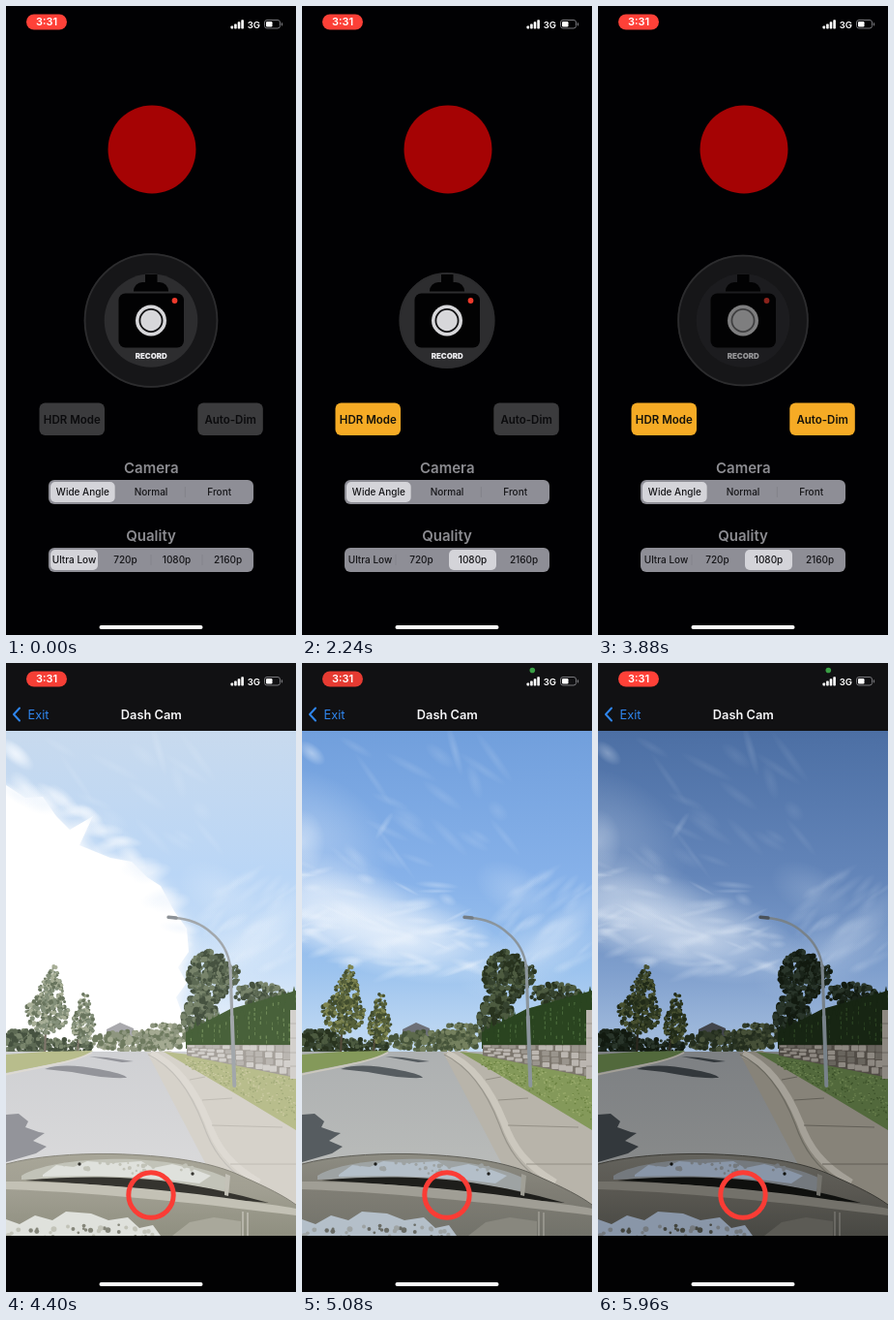
Animation of 300x649 px, one loop 6 s. Source, as an HTML page with a canvas:

```html
<!DOCTYPE html>
<html lang="en">
<head>
<meta charset="utf-8">
<title>Dash Cam</title>
<style>
  html, body { margin: 0; width: 100%; height: 100%; overflow: hidden; background: #000; }
  canvas { display: block; width: 300px; height: 649px; }
</style>
</head>
<body>
<canvas id="stage"></canvas>
<script>
const W = 300, H = 649, LOOP = 6000;
const stage = document.getElementById('stage');
const dpr = window.devicePixelRatio || 1;
stage.width = W * dpr;
stage.height = H * dpr;
const ctx = stage.getContext('2d');

const clamp = v => Math.max(0, Math.min(1, v));
const span = (t, a, b) => clamp((t - a) / (b - a));
const ease = p => p * p * (3 - 2 * p);
const easeOut = p => 1 - Math.pow(1 - p, 3);

let seed = 1;
const rnd = () => (seed = (seed * 16807) % 2147483647) / 2147483647;

function box(x, y, w, h, r, fill) {
  ctx.fillStyle = fill;
  ctx.beginPath();
  ctx.roundRect(x, y, w, h, r);
  ctx.fill();
}

function disc(x, y, r, fill) {
  ctx.fillStyle = fill;
  ctx.beginPath();
  ctx.arc(x, y, r, 0, 7);
  ctx.fill();
}

function ring(x, y, r, width, color) {
  ctx.strokeStyle = color;
  ctx.lineWidth = width;
  ctx.beginPath();
  ctx.arc(x, y, r, 0, 7);
  ctx.stroke();
}

function shape(path, fill) {
  ctx.fillStyle = fill;
  ctx.fill(new Path2D(path));
}

function line(path, width, color) {
  ctx.strokeStyle = color;
  ctx.lineWidth = width;
  ctx.stroke(new Path2D(path));
}

function label(str, x, y, size, weight, color, align = 'center') {
  ctx.font = `${weight} ${size}px Inter, "Liberation Sans", sans-serif`;
  ctx.textAlign = align;
  ctx.textBaseline = 'alphabetic';
  ctx.fillStyle = color;
  ctx.fillText(str, x, y);
}

// ---------- home screen ----------

function segments(y, names, pos) {
  const w = 212 / names.length;
  box(44, y, 212, 25, 6, '#8e8e96');
  for (let i = 1; i < names.length; i++) {
    const gap = Math.min(Math.abs(i - pos), Math.abs(i - 1 - pos));
    if (gap > 0.4) box(43.5 + i * w, y + 7, 1, 11, 0, '#83838b');
  }
  box(46 + pos * w, y + 2, w - 4, 21, 5, '#d4d4d9');
  names.forEach((n, i) => label(n, 44 + (i + 0.5) * w, y + 16.2, 10, 500, '#151518'));
}

function toggle(x, str, on) {
  box(x, 409.5, 67.5, 33.5, 6, on ? '#f6ab25' : '#3b3b3d');
  label(str, x + 33.8, 430.5, 11.5, 600, on ? '#15120a' : '#0b0b0d');
}

function recordButton(t) {
  const p = (1 - Math.cos((t - 540) / 4000 * 2 * Math.PI)) / 2;
  const r = 72 - 24 * Math.pow(p, 1.25);
  disc(150, 324.5, r, '#161618');
  ring(150, 324.5, r - 1, 1.8, '#2c2c2e');

  ctx.save();
  const press = span(t, 3800, 3880);
  ctx.globalAlpha = 1 - 0.7 * press;
  disc(150, 324.5, 48.3, '#2d2d2f');
  ctx.globalAlpha = 1;
  box(144, 277, 12.5, 10, 0, '#020203');
  box(132, 285, 36, 9.5, [9, 9, 0, 0], '#020203');
  box(116.5, 296.5, 67.5, 56, 7, '#020203');
  ctx.globalAlpha = 1 - 0.42 * press;
  disc(150, 324.5, 16, '#d7d7da');
  ring(150, 324.5, 11.6, 1.8, '#111113');
  disc(174.5, 304, 2.9, '#ee3a2c');
  label('RECORD', 150.2, 364, 7.9, 900, '#ededf0');
  ctx.restore();
}

function home(t) {
  ctx.fillStyle = '#010103';
  ctx.fillRect(0, 0, W, H);
  disc(151, 148, 45.5, '#a50304');
  recordButton(t);
  toggle(34.5, 'HDR Mode', t >= 1600);
  toggle(198.3, 'Auto-Dim', t >= 2400);
  label('Camera', 150.3, 482, 15, 600, '#8c8c91');
  segments(489, ['Wide Angle', 'Normal', 'Front'], 0);
  label('Quality', 150, 552, 15, 600, '#8c8c91');
  segments(559, ['Ultra Low', '720p', '1080p', '2160p'], 2 * ease(span(t, 800, 1100)));
}

// ---------- camera view ----------

let expo = 0;

// Blends a colour through bright, medium and settled exposure
function tone(...hex) {
  const i = expo < 1 ? 0 : 1, f = expo - i;
  const ch = (h, k) => parseInt(h.substr(k * 2, 2), 16);
  const rgb = [0, 1, 2].map(k => Math.round(ch(hex[i], k) * (1 - f) + ch(hex[i + 1], k) * f));
  return `rgb(${rgb})`;
}

function level(a, b, c) {
  return expo < 1 ? a + (b - a) * expo : b + (c - b) * (expo - 1);
}

function leaves(cx, cy, rx, ry, n, size, colors) {
  for (let i = 0; i < n; i++) {
    const a = rnd() * 6.283, d = Math.sqrt(rnd());
    disc(cx + Math.cos(a) * d * rx, cy + Math.sin(a) * d * ry,
      size * (0.5 + rnd() * 0.7), colors[i % colors.length]);
  }
}

function puff(x, y, rx, ry, tilt, alpha) {
  ctx.save();
  ctx.translate(x, y);
  ctx.rotate(tilt);
  ctx.scale(rx, ry);
  const g = ctx.createRadialGradient(0, 0, 0, 0, 0, 1);
  g.addColorStop(0, `rgba(240,246,253,${alpha})`);
  g.addColorStop(0.5, `rgba(240,246,253,${alpha * 0.55})`);
  g.addColorStop(1, 'rgba(240,246,253,0)');
  disc(0, 0, 1, g);
  ctx.restore();
}

function sky() {
  const g = ctx.createLinearGradient(0, 70, 0, 400);
  g.addColorStop(0, tone('c8daee', '719fdc', '4c6fa4'));
  g.addColorStop(0.45, tone('bad6f6', '86b1e9', '6385b9'));
  g.addColorStop(0.75, tone('c9dff7', '9cc3ee', '7f9fcd'));
  g.addColorStop(1, tone('f2f6fb', 'c5dcf3', 'a6bfdf'));
  ctx.fillStyle = g;
  ctx.fillRect(0, 70, W, 340);

  const a = level(0.75, 0.75, 0.5);
  puff(50, 262, 150, 46, 0.14, a);
  puff(100, 285, 120, 42, 0.18, a * 0.9);
  puff(20, 235, 90, 40, 0.1, a * 0.7);
  puff(10, 175, 90, 60, 0.5, a * 0.4);
  puff(0, 185, 24, 34, 0, a * 0.6);
  puff(268, 275, 65, 18, -0.75, a * 0.4);
  puff(240, 300, 85, 36, -0.4, a * 0.4);
  puff(220, 235, 45, 26, 0.5, a * 0.3);
  puff(10, 93, 17, 9, 0.7, a * 0.6);
  puff(85, 168, 17, 4, -1, a * 0.35);
  puff(158, 90, 28, 5, 1.3, a * 0.25);
  seed = 77;
  for (let i = 0; i < 70; i++) {
    const x = rnd() * 205 - 10, y = 212 + rnd() * 95 + x * 0.12;
    puff(x, y, 9 + rnd() * 20, 2 + rnd() * 5, -0.5 + rnd(), a * 0.4);
  }
  for (let i = 0; i < 26; i++) {
    puff(180 + rnd() * 125, 220 + rnd() * 95, 10 + rnd() * 18, 3 + rnd() * 4, -0.9 + rnd() * 0.5, a * 0.22);
  }
  for (let i = 0; i < 24; i++) {
    puff(rnd() * 230, 85 + rnd() * 125, 12 + rnd() * 26, 3 + rnd() * 6, 0.3 + rnd(), a * 0.16);
  }

  // Blown-out area while the exposure is still too high
  ctx.save();
  ctx.globalAlpha = level(1, 0, 0);
  ctx.shadowColor = '#fff';
  ctx.shadowBlur = 14 * dpr;
  shape('M0 126L20 139L38 138L52 158L66 172L90 158L76 188L108 201L130 205L146 221L160 230' +
    'L174 256L187 274L189 298L178 314L187 330L176 345L186 372V400H0Z', '#fff');
  ctx.shadowBlur = 0;
  puff(10, 94, 24, 10, 0.7, 0.9);
  for (let i = 0; i < 18; i++) {
    const k = i / 17;
    puff(170 * k + 10, 128 + 130 * k * k + rnd() * 16, 22, 6 + rnd() * 6, -0.5 + rnd() * 1.4, 0.7);
  }
  ctx.restore();
}

function greenery() {
  const far = [tone('8e967f', '5d6a4c', '303a28'), tone('a4aa92', '75815f', '465038'), tone('6f7b60', '46543a', '232d1e')];
  const tree = [tone('5d6a54', '36432f', '1a241a'), tone('78846b', '4d5b40', '29352a'), tone('465240', '28331f', '121a10')];
  const young = [tone('84907a', '566039', '2d3720'), tone('a8af97', '7d8450', '475030'), tone('69755e', '414c2e', '202a18')];
  const hedge = tone('48613a', '2a4420', '172513');
  const hedgeLit = tone('6f8a58', '49693a', '2b4222');
  const bark = tone('80776c', '544b3c', '2b281f');

  shape('M104 378L118 371L132 377V390H104Z', tone('a9a9ad', '6d7078', '42454c'));
  seed = 12;
  leaves(140, 390, 52, 10, 220, 2.8, far);
  leaves(162, 384, 24, 13, 130, 2.6, far);
  leaves(210, 324, 22, 27, 420, 2.6, tree);
  leaves(230, 322, 12, 13, 80, 2.3, tree);
  leaves(201, 366, 18, 25, 300, 2.8, tree);
  leaves(262, 342, 26, 12, 160, 2.6, tree);
  shape('M186 398V381L232 357L300 338V400Z', hedge);
  for (let x = 190; x < 304; x += 6) {
    const top = 374 - (x - 190) * 0.34 + rnd() * 5;
    shape(`M${x - 4} 398L${x - 4} ${top + 12}L${x} ${top - 5}L${x + 4} ${top + 12}L${x + 4} 398Z`, hedge);
    for (let y = top + 4; y < 390; y += 5) {
      if (rnd() > 0.35) box(x + rnd() * 2, y, 1.3, 3.5, 0.6, hedgeLit);
    }
  }

  leaves(16, 393, 28, 14, 320, 2.6, tree);
  leaves(63, 395, 27, 7, 130, 2.4, tree);
  line('M40 406L42 350', 2.2, bark);
  line('M74 402L77 365', 1.8, bark);
  leaves(43, 361, 22, 21, 260, 2.2, young);
  leaves(46, 340, 13, 17, 110, 2, young);
  leaves(49, 324, 6, 11, 45, 1.8, young);
  leaves(80, 374, 12, 17, 150, 2, young);
  leaves(81, 354, 6, 13, 55, 1.8, young);
}

function ground() {
  const grass = tone('b8bd8c', '84995a', '52693c');
  const curb = tone('dedad3', 'ccc8be', 'a5a198');
  const shade = tone('93949a', '565c60', '33383c');
  const g = ctx.createLinearGradient(0, 400, 0, 530);
  g.addColorStop(0, tone('cfd0d3', 'adb0b1', '7d8083'));
  g.addColorStop(1, tone('dadadb', 'babcba', '898b8b'));
  ctx.fillStyle = g;
  ctx.fillRect(0, 401, W, 190);

  shape('M0 404L40 401L90 400L76 408L0 423Z', grass);
  line('M0 424.5C40 416 70 412 89 402', 1.8, curb);

  shape('M146 402L170 400L300 470V580H240Z', tone('d6d2ca', 'b8b4aa', '878379'));
  shape('M163 401L190 404L300 427V482L235 443Z', grass);
  seed = 31;
  const blades = [tone('cbcaa2', '9cad6e', '6a804e'), tone('9fa878', '69803f', '3b5029')];
  for (let i = 0; i < 300; i++) {
    const x = 185 + rnd() * 115, k = (x - 163) / 137;
    box(x, 403 + k * 26 + rnd() * k * 46, 1.6, 1.2, 0, blades[i % 2]);
  }
  line('M150 403C178 415 196 442 209 474C218 500 232 518 262 536', 7, curb);
  line('M147 404C172 416 191 442 204 476C213 502 226 520 250 536', 1.2,
    tone('c3c0ba', '98958c', '6a685f'));
  line('M190 430L206 427M203 451L234 449M213 477L286 479M232 517L300 517', 1,
    tone('c0bcb4', '949086', '625f57'));

  const stone = [tone('d3d0cc', 'bbb6b0', '8d8881'), tone('bab6b1', '9a958d', '69655e')];
  shape('M187 394H300V428L187 405Z', tone('a5a09a', '7c766d', '504b45'));
  for (let row = 0; row < 4; row++) {
    for (let x = 188 + (row % 2) * 4; x < 298; x += 7 + rnd() * 4) {
      const h = (11 + (x - 187) * 0.2) / 4;
      box(x, 394.5 + row * h, 7.5, h - 0.8, 1, stone[rnd() > 0.6 ? 1 : 0]);
    }
  }
  box(294, 358, 6, 71, 0, stone[0]);
  line('M294 372H300M294 387H300M294 402H300M294 416H300', 1, stone[1]);

  shape('M40 419C56 413 78 416 96 419C112 422 124 425 125 428C104 429 84 425 68 422Z', shade);
  shape('M86 406L104 407L132 411L120 412Z', shade);
  shape('M0 466L13 465L23 473L20 479L34 484L40 485L28 493L42 499L31 506L0 515Z', shade);
}

function lamp() {
  const pole = tone('a2a7ab', '8b959c', '78828a');
  ctx.lineCap = 'round';
  line('M236.3 436L233.8 365', 4, pole);
  line('M233.8 365L232 312', 3.2, pole);
  line('M232 314C230 296 222 286 212 278C202 269 190 264 174 263', 2.4, pole);
  line('M168 262.3L176 263', 3.4, tone('8c9196', '737c84', '4a525a'));
  ctx.lineCap = 'butt';
}

function hood() {
  const edge = 'M0 517C30 509 70 506 110 506.5C165 508 212 514 245 530C270 541 288 550 300 559';
  const g = ctx.createLinearGradient(0, 505, 0, 591);
  g.addColorStop(0, tone('a8a698', '8e8d83', '64635d'));
  g.addColorStop(0.45, tone('a19f92', '807e75', '5a5852'));
  g.addColorStop(1, tone('8f8f80', '72726a', '484843'));
  shape(edge + 'V591H0Z', g);

  const glow = tone('dfe1dc', 'b4bfc9', '8996a8');
  const haze = tone('c2c3b8', '9ea3a3', '74797e');
  const dark = tone('35342f', '1e1e1b', '0f100e');
  shape('M16 529C40 515 90 511 130 512C170 514 205 520 230 532L226 545C170 533 95 530 16 533Z', haze);
  seed = 58;
  shape('M38 528L52 518L70 520L84 514L110 516L140 514L152 521L172 517L196 523L212 529L200 537C150 530 95 528 38 530Z', glow);
  leaves(125, 521, 85, 6, 26, 2, [haze]);
  shape('M20 534C70 529 120 530 160 534C205 540 235 547 272 557L225 553C165 544 90 537 20 534Z', dark);
  shape('M0 535C80 535 180 545 235 553C260 557 285 560 300 563V570C220 560 110 547 0 543Z',
    tone('c3c1b5', 'a09e95', '73716a'));
  shape('M0 591V574L14 579L30 570L48 575L62 566L88 568L106 575L126 572L138 583L152 580L160 591Z', glow);
  leaves(75, 590, 80, 12, 60, 2.6, [haze, tone('85867a', '6a6c66', '43453f')]);
  shape('M172 591L190 577L215 572L243 576V591Z', tone('a9a89b', '88877e', '5c5b55'));
  shape('M227 527L232 529L230 550L226 549Z', tone('c4c2b8', 'a09f96', '74736d'));
  line('M245 566V591M250 567V591', 1.3, tone('c9c7bd', 'a5a49b', '7a7973'));
  line(edge, 1, tone('87857a', '5f5e57', '3a3934'));
  disc(76, 517, 1.7, dark);
  disc(193, 527, 1.7, dark);
}

function camera(t) {
  ctx.fillStyle = '#020203';
  ctx.fillRect(0, 0, W, H);
  if (t >= 4240) {
    expo = span(t, 4400, 5080) + span(t, 5080, 5960);
    ctx.save();
    ctx.beginPath();
    ctx.rect(0, 70, W, 521);
    ctx.clip();
    sky();
    greenery();
    ground();
    lamp();
    hood();
    ctx.restore();
  }
  ring(150, 549, 23.2, 5, '#fb3c35');
  ctx.fillStyle = '#111113';
  ctx.fillRect(0, 0, W, 70);
  ctx.lineCap = ctx.lineJoin = 'round';
  line('M14 46.5L8 53L14 59.5', 2, '#2f86ee');
  ctx.lineCap = 'butt';
  label('Exit', 22.5, 57.7, 12.8, 400, '#2f86ee', 'left');
  label('Dash Cam', 150.3, 57.7, 12.8, 600, '#f6f6f8');
}

// ---------- status bar ----------

function statusBar(t) {
  const glow = 0.95 + 0.05 * Math.cos(t / 2000 * 2 * Math.PI);
  box(21, 8.5, 42, 16, 8, `rgb(${[255, 65, 56].map(v => Math.round(v * glow))})`);
  label('3:31', 42, 20.4, 11, 600, '#fff');
  for (let i = 0; i < 4; i++) {
    const h = 3 + i * 2.1;
    box(232.5 + i * 3.6, 23.5 - h, 2.6, h, 0.7, '#fff');
  }
  label('3G', 249.7, 23, 9.6, 600, '#fff', 'left');
  ctx.strokeStyle = '#77777b';
  ctx.lineWidth = 1;
  ctx.beginPath();
  ctx.roundRect(267.5, 14.5, 16, 8.5, 2.5);
  ctx.stroke();
  box(269, 16, 6.5, 5.5, 1.2, '#fff');
  box(284.8, 17.2, 1.3, 3.2, 0.6, '#77777b');
  if (t >= 4560) disc(238.3, 7.5, 2.8, '#3a9f45');
  box(96.5, 639, 107, 4, 2, '#fff');
}

function draw(t) {
  ctx.setTransform(dpr, 0, 0, dpr, 0, 0);
  const p = easeOut(span(t, 3900, 4300));
  if (p < 1) {
    ctx.save();
    ctx.translate(-90 * p, 0);
    home(t);
    ctx.restore();
  }
  if (p > 0) {
    ctx.save();
    ctx.translate(W * (1 - p), 0);
    camera(t);
    ctx.restore();
  }
  statusBar(t);
}

const start = performance.now();
function tick() {
  draw((performance.now() - start) % LOOP);
  requestAnimationFrame(tick);
}
tick();
</script>
</body>
</html>
```
